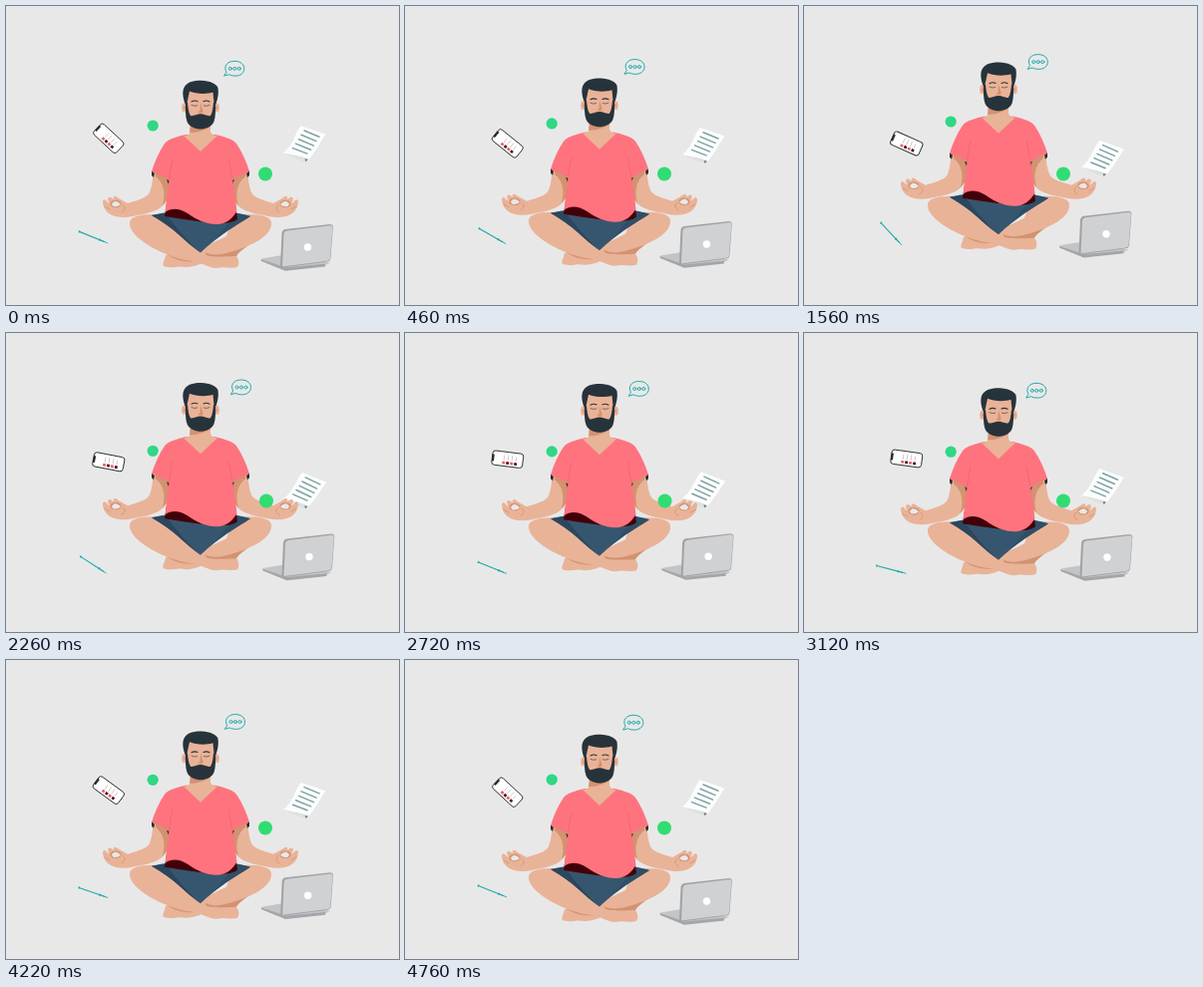
These frames come from a looping animation (394 px wide and 300 px high, 4.78 s). An HTML page:

```html
<!DOCTYPE html>
<html lang="en">
<head>
<meta charset="utf-8">
<title>Floating meditation</title>
<style>
html, body { margin: 0; width: 100%; height: 100%; overflow: hidden; background: #e8e8e8; }
svg { display: block; width: 100%; height: 100%; }
.skin { fill: #e9b398; }
.shade { fill: #d39270; }
.dark { fill: #27333b; }
.line { fill: none; stroke-linecap: round; stroke-linejoin: round; }
</style>
</head>
<body>
<svg viewBox="0 0 394 300">
  <g id="bubble" class="line" stroke="#22aaab" stroke-width="1">
    <path d="M-8.200 3C-11 -1.700 -8 -7.700 0 -7.700C6.500 -7.700 9.800 -4.200 9.800 -.2C9.800 4.300 6 7.100 1 7.100C-2 7.100 -4 6.500 -5.500 5.700L-10 7Z"/>
    <circle cx="-4.200" cy="-.2" r="1.500"/><circle cx=".3" cy="-.2" r="1.500"/><circle cx="4.800" cy="-.2" r="1.500"/>
  </g>

  <g id="phone">
    <rect x="-15.500" y="-7.200" width="31" height="14.400" rx="2.800" fill="#fff" stroke="#25282d" stroke-width=".9"/>
    <path d="M-15.500 -3.500h1.200q.8 0 .8 .8v5.400q0 .8 -.8 .8h-1.200z" fill="#25282d"/>
    <path d="M-3.500 -3.500V1M.5 -4V1M4.500 -4V1M8.500 -3V1" class="line" stroke="#b9a4a8" stroke-width=".6"/>
    <path d="M-5 2.500h2.800v2.600H-5zM3 2.500h2.800v2.600H3z" fill="#ec5b64"/>
    <path d="M-1 2.500h2.800v2.600H-1zM7 2.500h2.800v2.600H7z" fill="#4b1118"/>
  </g>

  <circle id="badge" r="5.600" fill="#30d784"/>

  <g id="pen" class="line" stroke="#20a8a7">
    <path d="M-15 0H12" stroke-width="1.100"/>
    <path d="M8 0H15.300" stroke-width=".8"/>
    <path d="M-15 -.5V.5M7 -.5V.5" stroke-width="1.400"/>
  </g>

  <g id="paper">
    <path d="M-4 -18L21 -9.500C16 -3 12 7 3 17L-21.500 9C-12 2 -10 -10 -4 -18Z" fill="#fcfdfd"/>
    <path d="M-21.500 9C-15 11 -5 12 .5 14L3.500 16.500L1 18L-5 16.500Z" fill="#dfe1e1"/>
    <path d="M0 15L3.500 15.500L1 18Z" fill="#777c7e"/>
    <path d="M-.5 -13.300L14.500 -7M-3.500 -9L11.500 -2.700M-6 -4.500L9 1.800M-9 -.2L6 6M-12 4.300L2.500 9.800" class="line" stroke="#7fa1a4" stroke-width="1.500"/>
  </g>

  <g id="laptop">
    <path d="M256 253.500L277 250L325 257.500L320 260L280 264Z" fill="#c2c4c7"/>
    <path d="M255.500 253.800L280 262.600L320 258.800V261.500L280 265.700L256 256Z" fill="#a3a6a9"/>
    <path d="M275 261.500L276.500 228Q277 224.500 280 224L324.500 219Q328 219 327.800 222L325.500 253Q325.200 256 322 256.500L277 262.500Z" fill="#9fa2a6"/>
    <path d="M277 261.500L278.500 228.500Q278.800 226 281.500 225.500L325 220.200Q327.500 220 327.300 223L325 252.500Q324.800 255.300 322 255.700Z" fill="#cfd1d3"/>
    <circle cx="302.500" cy="242" r="3.700" fill="#fff"/>
  </g>

  <g id="man">
    <!-- legs and feet -->
    <path class="skin" d="M147 209C132 209 123 212 124 219C125 230 143 242 161 249C172 254 185 256 197 256L203 243L190 211Z"/>
    <path class="skin" d="M160 250C167 247 178 251 194 254L203 255C196 258 190 262 180 262C172 260 165 264 158 261C156 259 159 256 160 250Z"/>
    <path class="shade" d="M161 248.500C170 253 180 255 192 255.500C182 258 168 255 161 248.500Z"/>
    <path class="skin" d="M161 244C185 249 216 247 231 251C234 255 234 259 232 262C225 264 219 261 211 263C204 263 197 258 187 256C177 255 168 252 161 249Z"/>
    <path class="shade" d="M199 246L250 234C244 241 235 244 231 251C220 251.500 207 252 201 250Z"/>
    <path class="skin" d="M243 209C258 209 267 212 266 219C265 232 246 240 231 245C219 249 209 251 202 248C196 246 197 242 202 240L221 231L228 210Z"/>

    <!-- shorts -->
    <path d="M146 210C154 208 160 207 165 207H226C234 208 240 209 245 211C231 220 213 230 195 247.500C180 237 168 222 146 210Z" fill="#36566f"/>
    <path d="M146 210L160 208C171 223 183 237 195 247.500C180 237 168 222 146 210Z" fill="#2b465d"/>
    <path d="M245 211L231 208C222 220 209 235 197 245.500C213 230 231 220 245 211Z" fill="#2f4e66"/>

    <g id="arm">
      <path class="skin" d="M148 163L165 171C166 186 163 197 154 203C146 208 135 209 127 211C118 213 108 212 103 208C99 205 97 200 97 196C98 193 100 194 102 197L104 198C101 194 102 191 105 192L108 194C107 190 110 190 113 193L122 198C132 195 142 192 144 187C147 179 147 172 148 163Z"/>
      <path class="shade" d="M150 166L165 171C166 184 163 195 157 200C160 189 159 178 150 171Z"/>
      <ellipse class="shade" cx="110" cy="198.500" rx="5.500" ry="3.800"/>
      <path d="M105.800 198.500L109 195.700Q113 196 115 199Q112 202 107.500 201Z" fill="#e8e8e8"/>
      <path d="M99 201L104 204M117 200C120 201 120 205 116 207" class="line" stroke="#d39270" stroke-width=".8"/>
      <path d="M146 165L149 168L148 172L146 170ZM161 174L165.500 176L165 181L163 179Z" fill="#322c35"/>
    </g>
    <use href="#arm" transform="matrix(-1 0 0 1 390 0)"/>

    <!-- shirt -->
    <path d="M161 198L230 198L232 214C228 217 222 218 214 218C196 217 178 214 159 211Z" fill="#430008"/>
    <path d="M180 129C172 131 163 133 159 138C153 147 149 156 146 166C151 168 158 171 163.500 174C162 185 161 196 159.500 207C166 202 174 203 182 208C192 215 201 219 211 219C221 219 227 213 231.500 206C230 196 229 184 227 174C232 171 239 168 244 166C241 156 237 147 231 138C227 133 218 131 210 129Z" fill="#ff737e"/>
    <path d="M163.500 174C165 166 165 160 167 154M227 174C225 166 225 160 223 154" class="line" stroke="#ef6470" stroke-width=".8"/>
    <path class="skin" d="M185 115H205V126C206 129 209 130 212 130L195 146L178 130C182 130 185 128 185 125Z"/>
    <path class="shade" d="M185 117H205V121C198 125 192 127 184 127Z"/>

    <!-- head -->
    <ellipse class="skin" cx="178.800" cy="102" rx="2.700" ry="4.600"/>
    <ellipse class="skin" cx="211.200" cy="102" rx="2.700" ry="4.600"/>
    <path class="shade" d="M178 100L180 102L179 105ZM212 100L210 102L211 105Z"/>
    <path class="skin" d="M181 84H209V108C208 118 202 122 195 122C188 122 182 118 181 108Z"/>
    <path class="dark" d="M179.500 98C177 91 176.500 85 179 81C182 76 189 74.700 196 74.800C204 75 211 78 212.500 82C213.500 88 212 94 210.500 98L208.500 97L207.500 86.500C200 89 190 88 184 85.500L181.500 97Z"/>
    <path class="dark" d="M179.800 96L182 97C182.500 102 183 107 185 110C188 111 191 108.300 195 108.300C199 108.300 202 111 205 110C207 107 207.500 102 208 97L210.200 96C210 104 210.300 111 208.500 116C206 121.500 200 123.500 195 123.500C190 123.500 184 121.500 181.500 116C179.700 111 180 104 179.800 96Z"/>
    <path class="shade" d="M195 97L197.500 105Q198 107.500 195 107.500L192.500 106.500L194.500 105Z"/>
    <path d="M186 96Q189 94.300 192 95.700M198 95.700Q201 94.300 204 96" class="line" stroke="#27333b" stroke-width="1.100"/>
    <path d="M186 99.500Q188.800 101 191.700 99.900M198.300 99.900Q201.200 101 204 99.500" class="line" stroke="#59443f" stroke-width=".7"/>
  </g>

  <circle id="dot" r="7" fill="#31dd72"/>
</svg>
<script>
const LOOP = 4780;
const TIMES = [0, 880, 1560, 2260, 3120, 3740];
const N = TIMES.length;

// Smooth periodic curve through one value per entry in TIMES.
function track(...v) {
  const at = i => TIMES[(i + N) % N] + LOOP * Math.floor(i / N);
  const val = i => v[(i + N) % N];
  const slope = i => (val(i + 1) - val(i - 1)) / (at(i + 1) - at(i - 1));
  return t => {
    let i = N - 1;
    while (t < TIMES[i]) i--;
    const d = at(i + 1) - at(i), u = (t - at(i)) / d, w = 1 - u;
    return w * w * (1 + 2 * u) * val(i) + u * u * (3 - 2 * u) * val(i + 1)
      + d * u * w * (w * slope(i) - u * slope(i + 1));
  };
}

const still = n => () => n;
const wave = (from, to) => t => from + (to - from) * (1 - Math.cos(2 * Math.PI * t / LOOP)) / 2;

// id: [x, y, rotation]
const parts = {
  man: [still(0), wave(0, -25), still(0)],
  bubble: [track(229, 232, 234.5, 235.7, 233, 231), track(63, 59, 56.3, 54.7, 58, 60.7), still(0)],
  phone: [still(102.8), track(132.8, 141.8, 138, 129.3, 126, 129.3), track(43, 32, 24, 11, 8, 26)],
  badge: [still(147.2), track(120, 116, 116, 118.3, 119.2, 120), still(0)],
  dot: [track(260, 260, 260, 261, 260, 260), still(168.5), still(0)],
  pen: [still(87.4), track(232, 229.7, 228.5, 232.5, 237.3, 234.7), track(22, 38, 47, 33, 15, 18)],
  paper: [wave(299.5, 300), wave(138.3, 158.3), track(0, 0, 1, 3, 1, 0)],
  laptop: [track(0, 0, .5, 1.5, 1.5, .5), track(0, -8, -13.3, -17.5, -17, -12.4), still(0)]
};
const nodes = Object.entries(parts).map(([id, p]) => [document.getElementById(id), p]);

function draw() {
  const t = performance.now() % LOOP;
  for (const [el, [x, y, r]] of nodes) {
    el.setAttribute('transform', `translate(${x(t)} ${y(t)}) rotate(${r(t)})`);
  }
  requestAnimationFrame(draw);
}
draw();
</script>
</body>
</html>
```
